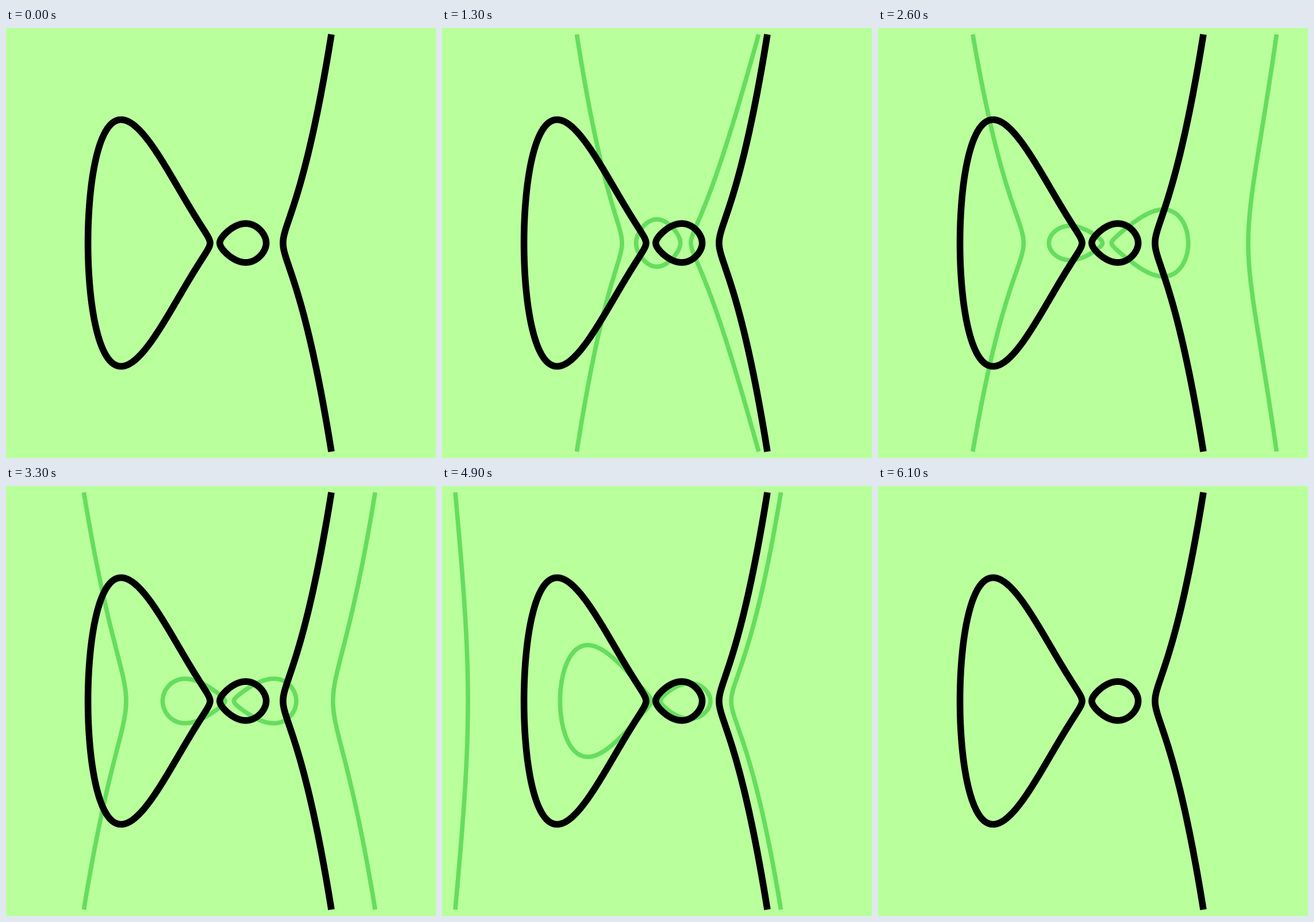
An HTML page with a canvas that plays this animation: 748x748 px, repeating every 6.2 s.

```html
<!DOCTYPE html>
<html lang="en">
<head>
<meta charset="utf-8">
<title>Order-three automorphism of a genus 2 curve</title>
<style>
  html, body { margin: 0; width: 100%; height: 100%; overflow: hidden; background: #b9ff9c; }
  canvas { display: block; width: 748px; height: 748px; }
</style>
</head>
<body>
<canvas id="stage" width="748" height="748"></canvas>
<script>
const ctx = document.getElementById('stage').getContext('2d');
const rad = Math.PI / 180;

// x = X0 + R tan(phi) turns the automorphism into a 60 degree rotation of phi.
const X0 = 388.6, R = 82.5, MID = 374, HALF = 362.8;
const A = -11.46 * rad, B = 37.8 * rad, THIRD = 60 * rad;
const SCALE = 983, SAMPLES = 500;
const STEPS = 62, STEP_MS = 100;

const inside = p => Math.abs(p.x) <= HALF && Math.abs(p.y) <= HALF;

// Point where the segment from p (inside) to q (outside) leaves the plot.
function exitPoint(p, q) {
  const limit = (from, to) => Math.abs(to) > HALF
    ? (Math.sign(to) * HALF - from) / (to - from) : 1;
  const k = Math.min(limit(p.x, q.x), limit(p.y, q.y));
  return { x: p.x + k * (q.x - p.x), y: p.y + k * (q.y - p.y) };
}

// One real component, upper half followed by its mirror image.
function component(k, turn, scale) {
  const half = [];
  for (let i = 0; i <= SAMPLES; i++) {
    const phi = A + k * THIRD + (B - A) * (1 - Math.cos(Math.PI * i / SAMPLES)) / 2;
    const tau = Math.tan(phi - turn);
    const f = Math.sin(3 * (phi - A)) * Math.sin(3 * (phi - B)) * -1;
    const y = Math.sqrt(Math.max(0, scale * f * (1 + tau * tau) ** 3));
    half.push({ x: X0 + R * tau - MID, y });
  }
  return half.concat(half.map(p => ({ x: p.x, y: -p.y })).reverse(), half[0]);
}

function trace(points) {
  let drawing = false;
  for (let i = 1; i < points.length; i++) {
    const p = points[i - 1], q = points[i];
    const pIn = inside(p), qIn = inside(q);
    if (!pIn && !qIn) { drawing = false; continue; }
    if (!drawing) {
      const start = pIn ? p : exitPoint(q, p);
      ctx.moveTo(start.x, start.y);
    }
    const end = qIn ? q : exitPoint(p, q);
    ctx.lineTo(end.x, end.y);
    drawing = qIn;
  }
}

// The map and its factor on y are both interpolated linearly, t from 0 to 1.
function curve(t, color, width) {
  const turn = Math.atan(Math.sqrt(3) * t);
  const scale = SCALE * (1 + 3 * t * t) ** 3 / (1 - 9 * t) ** 2;
  ctx.beginPath();
  for (let k = -1; k <= 1; k++) trace(component(k, turn, scale));
  ctx.strokeStyle = color;
  ctx.lineWidth = width;
  ctx.stroke();
}

let shown = -1;
function render(now) {
  const step = Math.floor(now / STEP_MS) % STEPS;
  if (step !== shown) {
    shown = step;
    ctx.setTransform(1, 0, 0, 1, 0, 0);
    ctx.fillStyle = '#b9ff9c';
    ctx.fillRect(0, 0, 748, 748);
    ctx.translate(MID, MID);
    ctx.lineJoin = 'round';
    curve(step / (STEPS - 1), '#66dd5e', 7.7);
    curve(0, '#000', 11.6);
  }
}

const begin = performance.now();
function loop() {
  render(performance.now() - begin);
  requestAnimationFrame(loop);
}
loop();
</script>
</body>
</html>
```
